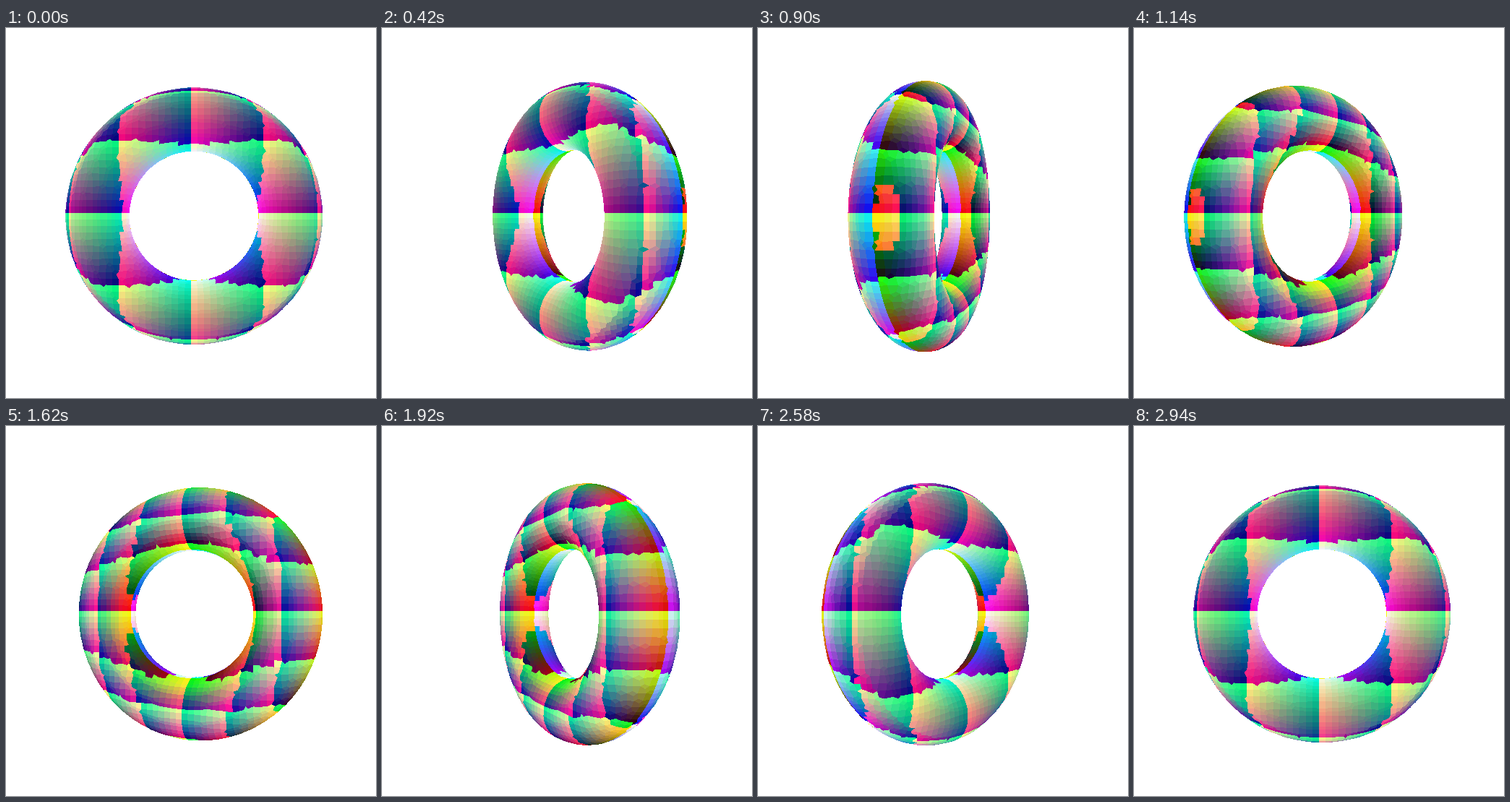
Animation of 512x512 px, one loop 3 s. Source, as an HTML page with a canvas:

```html
<!DOCTYPE html>
<html lang="en">
<head>
<meta charset="utf-8">
<title>Rotating torus</title>
<style>
  html, body { margin: 0; width: 100%; height: 100%; overflow: hidden; background: #fff; }
  canvas { display: block; width: 512px; height: 512px; }
</style>
</head>
<body>
<canvas id="stage" width="512" height="512"></canvas>
<script>
const SIZE = 512;
const FOCAL = 256 / Math.tan(Math.PI / 6);
const CAMERA = 3.46;
const RING = 1.024, TUBE = 0.3286;
const CELL = 4 / 63;
const LIGHT = [0, 0, 1];
const AMBIENT = 1.415, DIFFUSE = 0.87;
const FRAMES = 50, FRAME_MS = 60;

const sub = (a, b) => a.map((v, i) => v - b[i]);
const dot = (a, b) => a[0] * b[0] + a[1] * b[1] + a[2] * b[2];
const cross = (a, b) => [
  a[1] * b[2] - a[2] * b[1],
  a[2] * b[0] - a[0] * b[2],
  a[0] * b[1] - a[1] * b[0]
];
const step = (c, axis, n) => c.map((v, i) => i === axis ? v + n : v);
const field = c =>
  Math.hypot(Math.hypot(c[0], c[1]) * CELL - RING, c[2] * CELL) - TUBE;

// Surface nets: one vertex per grid cell, one quad per crossed grid edge.
const verts = [];
const cells = new Map();

function cellVertex(cell) {
  const key = cell.join();
  if (cells.has(key)) return cells.get(key);
  const sum = [0, 0, 0];
  let count = 0;
  for (let axis = 0; axis < 3; axis++) {
    for (let m = 0; m < 4; m++) {
      let c = step(cell, (axis + 1) % 3, m & 1);
      c = step(c, (axis + 2) % 3, m >> 1);
      const a = field(c), b = field(step(c, axis, 1));
      if (a < 0 === b < 0) continue;
      step(c, axis, a / (a - b)).forEach((v, i) => sum[i] += v);
      count++;
    }
  }
  verts.push(sum.map(v => (v / count + 0.5) * CELL));
  cells.set(key, verts.length - 1);
  return verts.length - 1;
}

// Scaled position wraps around in each colour channel.
function faceColor(ids, axis, sign) {
  const [a, b, c, d] = ids.map(i => verts[i]);
  let n = cross(sub(c, a), sub(d, b));
  if (n[axis] * sign < 0) n = n.map(v => -v);
  const mid = a.map((v, i) => (v + b[i] + c[i] + d[i]) / 4);
  const ray = sub(mid, LIGHT);
  const facing = dot(n, ray) / (Math.hypot(...n) * Math.hypot(...ray) || 1);
  const scale = AMBIENT + DIFFUSE * Math.max(0, facing);
  const [red, green, blue] = mid.map(v => {
    const t = -v * scale;
    return Math.floor((t - Math.floor(t)) * 256);
  });
  return (255 << 24 | blue << 16 | green << 8 | red) >>> 0;
}

function buildFaces() {
  const faces = [];
  const wide = Math.ceil((RING + TUBE) / CELL) + 1;
  const deep = Math.ceil(TUBE / CELL) + 1;
  for (let x = -wide; x <= wide; x++)
    for (let y = -wide; y <= wide; y++)
      for (let z = -deep; z <= deep; z++) {
        const c = [x, y, z];
        const inside = field(c) < 0;
        for (let axis = 0; axis < 3; axis++) {
          if (inside === field(step(c, axis, 1)) < 0) continue;
          const u = (axis + 1) % 3, v = (axis + 2) % 3;
          const side = step(c, u, -1);
          const ids = [c, side, step(side, v, -1), step(c, v, -1)].map(cellVertex);
          faces.push({ ids, color: faceColor(ids, axis, inside ? 1 : -1) });
        }
      }
  return faces;
}

const faces = buildFaces();
const ctx = document.getElementById('stage').getContext('2d');
const image = ctx.createImageData(SIZE, SIZE);
const pixels = new Uint32Array(image.data.buffer);
const depth = new Float32Array(SIZE * SIZE);

function fillTriangle(a, b, c, color) {
  const area = (b[0] - a[0]) * (c[1] - a[1]) - (b[1] - a[1]) * (c[0] - a[0]);
  if (!area) return;
  const x0 = Math.ceil(Math.min(a[0], b[0], c[0]) - 0.5);
  const x1 = Math.floor(Math.max(a[0], b[0], c[0]) - 0.5);
  const y0 = Math.ceil(Math.min(a[1], b[1], c[1]) - 0.5);
  const y1 = Math.floor(Math.max(a[1], b[1], c[1]) - 0.5);
  for (let y = y0; y <= y1; y++) {
    for (let x = x0; x <= x1; x++) {
      const px = x + 0.5, py = y + 0.5;
      const wa = ((b[0] - px) * (c[1] - py) - (b[1] - py) * (c[0] - px)) / area;
      const wb = ((c[0] - px) * (a[1] - py) - (c[1] - py) * (a[0] - px)) / area;
      const wc = 1 - wa - wb;
      if (wa < 0 || wb < 0 || wc < 0) continue;
      const near = wa * a[2] + wb * b[2] + wc * c[2];
      const i = y * SIZE + x;
      if (near > depth[i]) {
        depth[i] = near;
        pixels[i] = color;
      }
    }
  }
}

function render(angle) {
  const cos = Math.cos(angle), sin = Math.sin(angle);
  const points = verts.map(([x, y, z]) => {
    const near = 1 / (CAMERA - x * sin - z * cos);
    return [
      SIZE / 2 + FOCAL * (x * cos - z * sin) * near,
      SIZE / 2 + FOCAL * y * near,
      near
    ];
  });
  pixels.fill(0xffffffff);
  depth.fill(0);
  for (const { ids, color } of faces) {
    const [a, b, c, d] = ids.map(i => points[i]);
    fillTriangle(a, b, c, color);
    fillTriangle(a, c, d, color);
  }
  ctx.putImageData(image, 0, 0);
}

const start = performance.now();
let shown = -1;

function tick() {
  const elapsed = Math.max(0, performance.now() - start);
  const frame = Math.floor(elapsed / FRAME_MS) % FRAMES;
  if (frame !== shown) {
    shown = frame;
    render(2 * Math.PI * frame / (FRAMES - 1));
  }
  requestAnimationFrame(tick);
}
tick();
</script>
</body>
</html>
```
